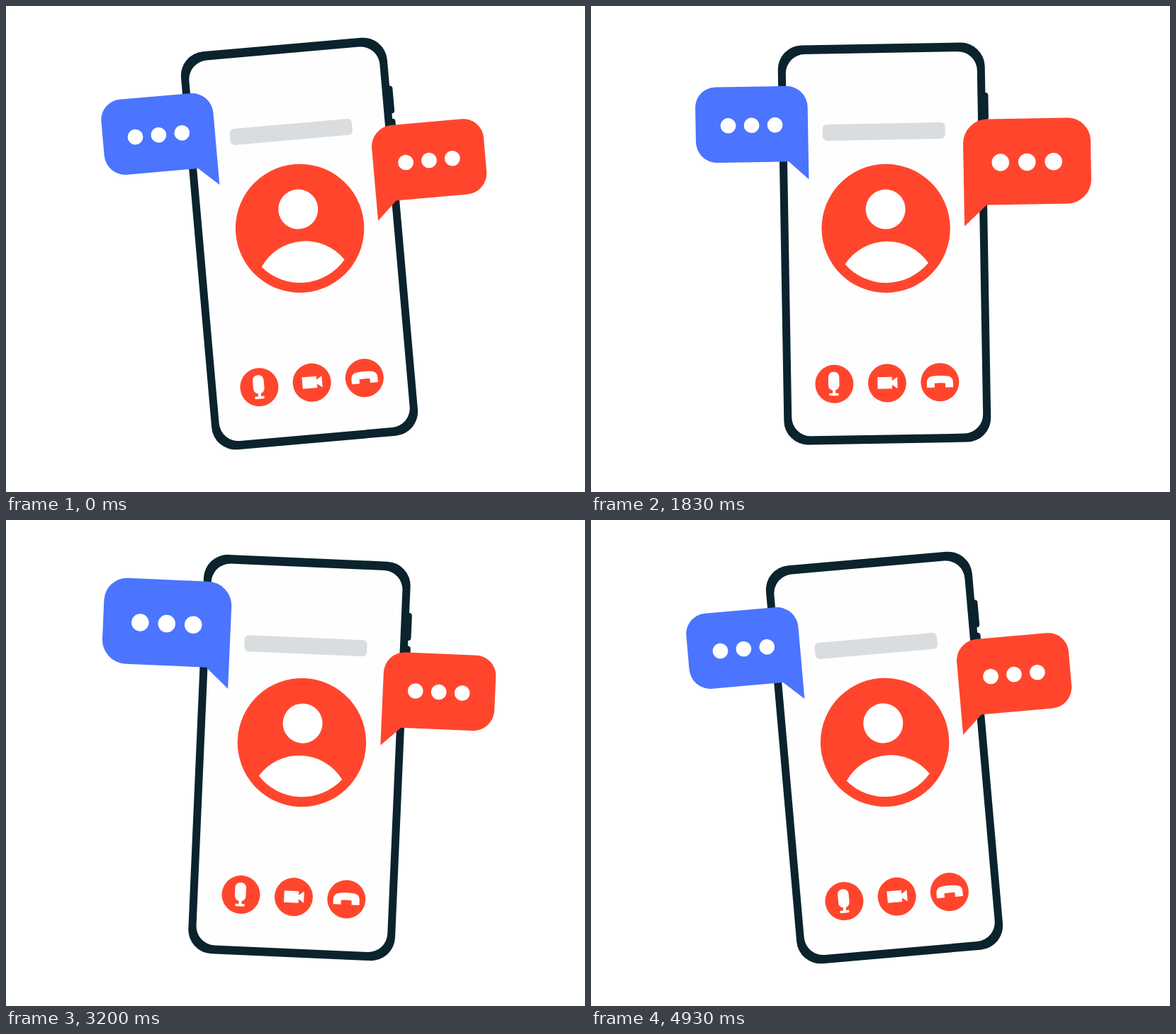
Animation, 817 px wide and 685 px high, one loop 5010 ms. Source, as an HTML page:

```html
<!DOCTYPE html>
<html lang="en">
<head>
<meta charset="utf-8">
<title>Video call</title>
<style>
  html, body { margin: 0; width: 100%; height: 100%; overflow: hidden; background: #fff; }
  svg { display: block; width: 100%; height: 100%; }
  .dark { fill: #0a232d; }
  .red { fill: #ff462d; }
  .blue { fill: #4b74ff; }
  .white { fill: #fff; }
</style>
</head>
<body>
<svg viewBox="0 0 817 685">
  <g id="phone">
    <g class="dark">
      <rect x="552" y="124.500" width="12" height="39" rx="4"/>
      <rect x="552" y="171" width="12" height="39" rx="4"/>
      <rect x="268" y="53.500" width="292" height="563" rx="34"/>
    </g>
    <rect x="279" y="66" width="270" height="538.500" rx="27" fill="#fefefe"/>
    <rect x="329.500" y="165.500" width="173" height="23" rx="6" fill="#d9dddf"/>

    <g id="avatar">
      <circle class="red" cx="416.500" cy="313.500" r="90.700"/>
      <g class="white">
        <circle cx="416.500" cy="286.500" r="28"/>
        <path d="M358 363A71 71 0 0 1 475.500 363A77 77 0 0 1 358 363Z"/>
      </g>
    </g>

    <g id="controls">
      <g class="red">
        <circle cx="340" cy="531.500" r="27"/>
        <circle cx="414.500" cy="531.500" r="27"/>
        <circle cx="489" cy="531.500" r="27"/>
      </g>
      <g class="white">
        <rect x="331.500" y="514.500" width="15.500" height="26" rx="7"/>
        <rect x="337.500" y="539" width="4" height="7"/>
        <rect x="332.500" y="544.500" width="13.500" height="3.500" rx="1.500"/>
        <path d="M401 523H421.500V528.500L429 523V539.500L421.500 534V539.500H401Z"/>
        <path d="M470.500 539v-7q0-8 8-9q10.500-1.500 21 0q8 1 8 9v7h-11v-6q-7.500-1-15 0v6z"/>
      </g>
    </g>

    <g id="blue">
      <path class="blue" d="M179 110.500H279A30 30 0 0 1 309 140.500V242.500L281 217H180.500A30 30 0 0 1 150.500 187V139A28.500 28.500 0 0 1 179 110.500Z"/>
      <g class="white">
        <circle cx="196.500" cy="165" r="10.800"/>
        <circle cx="229.500" cy="165" r="10.800"/>
        <circle cx="262.500" cy="165" r="10.800"/>
      </g>
    </g>

    <g id="red">
      <path class="red" d="M557.500 180H657.500A28.500 28.500 0 0 1 686 208.500V256.500A30 30 0 0 1 656 286.500H555.500L527.500 312.500V210A30 30 0 0 1 557.500 180Z"/>
      <g class="white">
        <circle cx="573.500" cy="234" r="10.800"/>
        <circle cx="606.500" cy="234" r="10.800"/>
        <circle cx="639.500" cy="234" r="10.800"/>
      </g>
    </g>
  </g>
</svg>
<script>
const LOOP = 5010;
const GROW = 1.136;

// Tracks: [start ms, end ms, from, to]
const tilt = [
  [245, 1590, -5, -1.25],
  [1667, 2750, -1.25, 2.5],
  [3420, 4380, 2.5, -5]
];
const pulse = (up, down) => [
  [up, up + 333, 1, GROW],
  [down, down + 333, GROW, 1]
];
const blueSize = [...pulse(100, 800), ...pulse(2633, 3300)];
const redSize = [...pulse(1533, 2130), ...pulse(3960, 4590)];

// Cubic bezier (.4, 0, .2, 1)
function ease(x) {
  if (x <= 0) return 0;
  if (x >= 1) return 1;
  let lo = 0, hi = 1, u;
  for (let i = 0; i < 24; i++) {
    u = (lo + hi) / 2;
    const v = 1 - u;
    if (1.2 * u * v * v + 0.6 * u * u * v + u * u * u < x) lo = u;
    else hi = u;
  }
  return u * u * (3 - 2 * u);
}

function valueAt(track, t) {
  let value = track[0][2];
  for (const [start, end, from, to] of track) {
    if (t < start) break;
    value = from + (to - from) * ease((t - start) / (end - start));
  }
  return value;
}

const [phone, blue, red] = ["phone", "blue", "red"].map(id => document.getElementById(id));

function scaleFrom(el, x, y, s) {
  el.setAttribute("transform", `translate(${x} ${y}) scale(${s}) translate(${-x} ${-y})`);
}

// Poses are held for 30 and 70 ms in turn
function heldTime(ms) {
  const base = Math.min(Math.floor(ms / 100), 49) * 100;
  return ms - base < 30 ? base : base + 33;
}

function draw(ms) {
  const t = heldTime(ms % LOOP);
  phone.setAttribute("transform", `rotate(${valueAt(tilt, t)} 414 335)`);
  scaleFrom(blue, 309, 242.5, valueAt(blueSize, t));
  scaleFrom(red, 527.5, 312.5, valueAt(redSize, t));
}

const began = performance.now();
function tick() {
  draw(performance.now() - began);
  requestAnimationFrame(tick);
}
draw(0);
requestAnimationFrame(tick);
</script>
</body>
</html>
```
